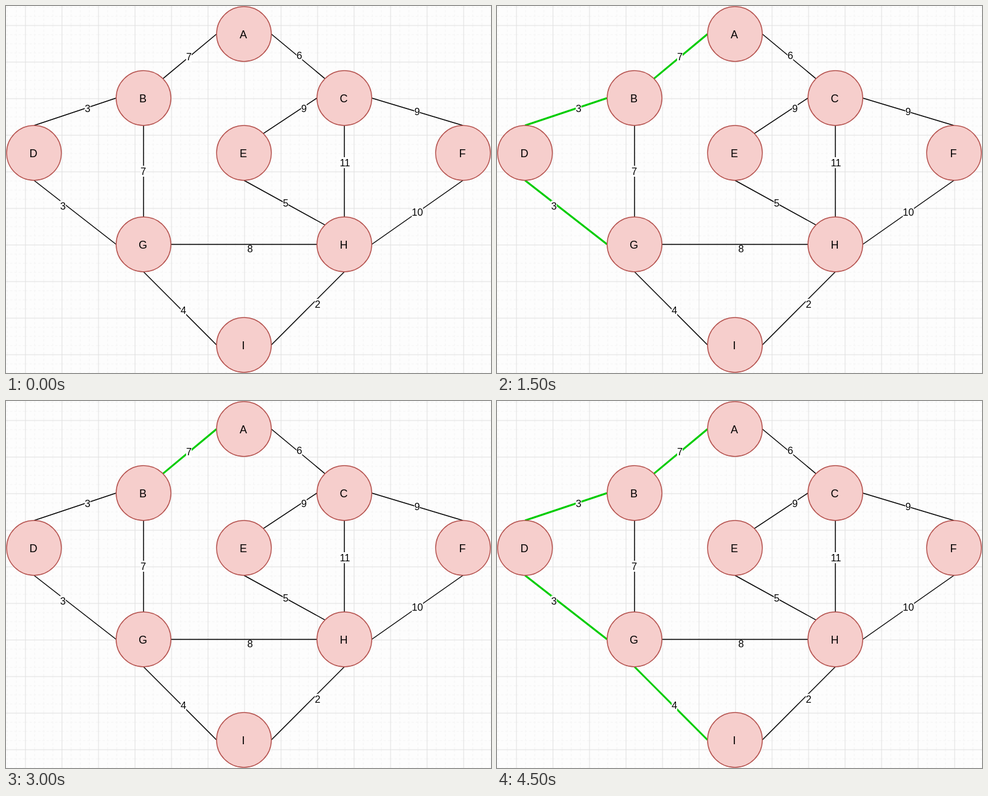
These frames come from a looping animation (797 px wide and 602 px high, 5 s). An HTML page:

```html
<!DOCTYPE html>
<html lang="en">
<head>
<meta charset="utf-8">
<title>Shortest path</title>
<style>
  html, body { margin: 0; width: 100%; height: 100%; overflow: hidden; background: #fff; }
  svg { display: block; width: 797px; height: 602px; }
  text { font-family: "Liberation Sans", Arial, sans-serif; text-anchor: middle; }
  circle { fill: #f6cecc; stroke: #b5524e; stroke-width: 1.5; }
  .edge { stroke: #000; stroke-width: 1.5; }
  .edge.chosen { stroke: #00cc00; stroke-width: 3; }
  .node { font-size: 18px; }
  .weight { font-size: 16.5px; }
</style>
</head>
<body>
<svg id="stage" viewBox="0 0 797 602">
  <defs>
    <pattern id="cells" x="31.5" y="31.5" width="60" height="60" patternUnits="userSpaceOnUse">
      <path d="M0 15.5H60M0 30.5H60M0 45.5H60M15.5 0V60M30.5 0V60M45.5 0V60"
        fill="none" stroke="#f3f3f3" stroke-dasharray="4 3"/>
      <path d="M0 .5H60M.5 0V60" fill="none" stroke="#dfdfdf"/>
    </pattern>
  </defs>
  <g id="grid">
    <rect width="797" height="602" fill="#fdfdfd"/>
    <rect width="797" height="602" fill="url(#cells)"/>
  </g>
</svg>
<script>
const STEP = 500, STEPS = 5, LOOP = 5000;
const RADIUS = 45;
const stage = document.getElementById('stage');
const grid = document.getElementById('grid');

const nodes = {
  A: [391, 46], B: [226, 151], C: [556, 151],
  D: [46, 241], E: [391, 241], F: [751, 241],
  G: [226, 391], H: [556, 391], I: [391, 556]
};

// Node and port at each end, then weight and label centre.
// Ports: l, r, t, b are the sides; lower-case pairs are the diagonals.
const edges = [
  ['A', 'l', 'B', 'tr', 7, 300.5, 83],
  ['B', 'l', 'D', 't', 3, 134, 168],
  ['D', 'b', 'G', 'l', 3, 93.5, 328],
  ['G', 'b', 'I', 'l', 4, 291.5, 499],
  ['A', 'r', 'C', 'tl', 6, 482, 81],
  ['E', 'tr', 'C', 'l', 9, 489.5, 168],
  ['C', 'r', 'F', 't', 9, 675.5, 173],
  ['B', 'b', 'G', 't', 7, 225.5, 270.5],
  ['C', 'b', 'H', 't', 11, 557, 256.5],
  ['E', 'b', 'H', 'tl', 5, 459.5, 323],
  ['F', 'b', 'H', 'r', 10, 676, 338],
  ['G', 'r', 'H', 'l', 8, 401, 398],
  ['H', 'b', 'I', 'r', 2, 512, 489]
];
const ports = {
  l: [-1, 0], r: [1, 0], t: [0, -1], b: [0, 1],
  tl: [-0.71, -0.71], tr: [0.71, -0.71]
};

function add(tag, attributes, content = '') {
  const element = document.createElementNS('http://www.w3.org/2000/svg', tag);
  for (const name in attributes) element.setAttribute(name, attributes[name]);
  element.textContent = content;
  return stage.appendChild(element);
}

function anchor(name, port) {
  return nodes[name].map((c, axis) => c + ports[port][axis] * RADIUS);
}

const lines = edges.map(([from, fromPort, to, toPort]) => {
  const [x1, y1] = anchor(from, fromPort);
  const [x2, y2] = anchor(to, toPort);
  return add('line', { class: 'edge', x1, y1, x2, y2 });
});

for (const [name, [cx, cy]] of Object.entries(nodes)) {
  add('circle', { cx, cy, r: RADIUS });
  add('text', { class: 'node', x: cx - 1, y: cy + 6.5 }, name);
}

for (const [, , , , weight, x, y] of edges) {
  const width = String(weight).length * 9.2;
  // The label below the G–H line leaves that line uncovered.
  const top = weight === 8 ? y - 6 : y - 8.5;
  add('rect', { x: x - width / 2, y: top, width, height: y + 9.5 - top, fill: '#fff' });
  add('text', { class: 'weight', x, y: y + 6 }, weight);
}

function draw(now) {
  const time = now % LOOP;
  const step = Math.floor(time / STEP);
  // The path A-B-D-G-I is the first four edges.
  lines.forEach((line, i) => line.classList.toggle('chosen', i < 4 && i < step % STEPS));
  grid.style.display = step === 4 ? 'none' : '';
  requestAnimationFrame(draw);
}
draw(0);
</script>
</body>
</html>
```
